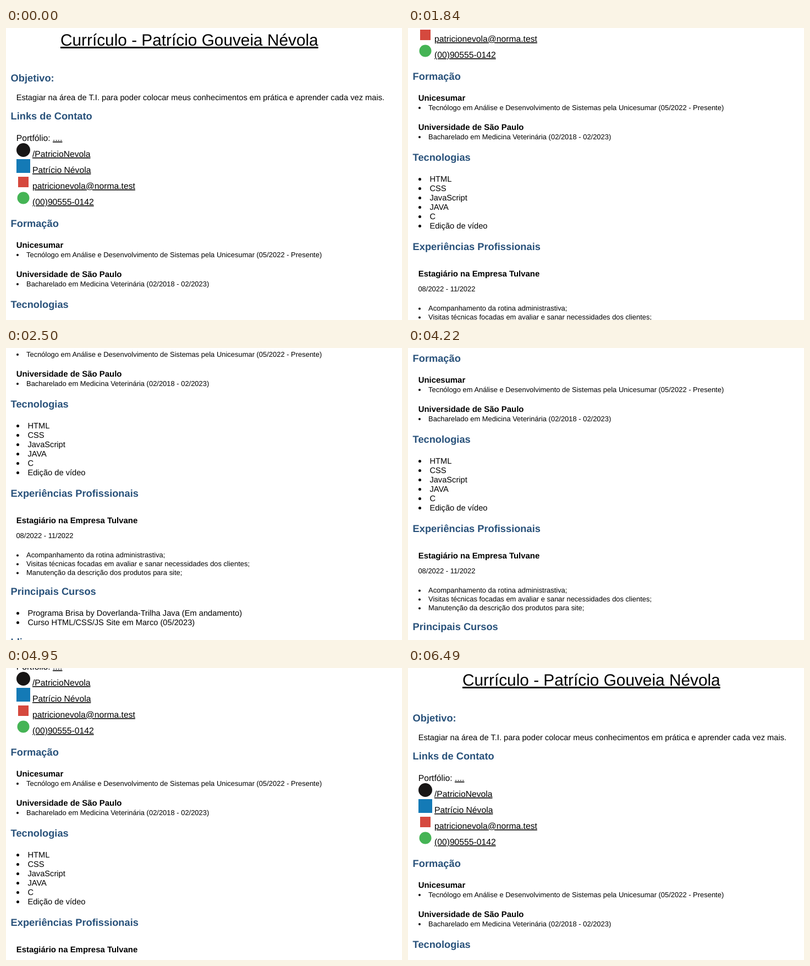
An HTML page for the animation above (7550 ms loop, 720 by 530 pixels).

```html
<!DOCTYPE html>
<html lang="pt-BR">
<head>
<meta charset="utf-8">
<title>Currículo</title>
<style>
  html, body { margin: 0; width: 100%; height: 100%; overflow: hidden; background: #fff; }
  svg { display: block; width: 720px; height: 530px; }
  text {
    font: 14.67px "Liberation Sans", Arial, sans-serif;
    text-rendering: geometricPrecision;
    white-space: pre;
  }
  .title { font-size: 29.8px; text-decoration: underline; }
  .heading text { font-size: 18.25px; font-weight: bold; fill: #28517a; }
  .contact text { font-size: 15.7px; }
  .link { text-decoration: underline; }
  .strong text { font-size: 14.95px; font-weight: bold; }
  .small text { font-size: 12.94px; }
  .dots { stroke: #000; stroke-width: 5; stroke-linecap: round; }
  .small .dots { stroke-width: 4; }

  /* One mouse-wheel notch moves the page by 133.33px, limited to 469px. */
  .page { animation: scroll 7550ms step-end infinite; }
  @keyframes scroll {
    0%      { transform: translateY(0); }
    13.906% { transform: translateY(-133px); }
    24.37%  { transform: translateY(-267px); }
    33.112% { transform: translateY(-400px); }
    41.853% { transform: translateY(-469px); }
    55.893% { transform: translateY(-336px); }
    65.562% { transform: translateY(-202px); }
    75.363% { transform: translateY(-69px); }
    85.96%, 100% { transform: translateY(0); }
  }
</style>
</head>
<body>
<svg viewBox="0 0 720 530">
  <g class="page">
    <text class="title" x="99" y="32">Currículo - Patrício Gouveia Névola</text>

    <g class="heading">
      <text x="8.6" y="97">Objetivo:</text>
      <text x="8.6" y="166">Links de Contato</text>
      <text x="8.6" y="361">Formação</text>
      <text x="8.6" y="508">Tecnologias</text>
      <text x="8.6" y="670">Experiências Profissionais</text>
      <text x="8.6" y="848">Principais Cursos</text>
      <text x="8.6" y="940">Idioma</text>
    </g>

    <text x="18.7" y="131">Estagiar na área de T.I. para poder colocar meus conhecimentos em prática e aprender cada vez mais.</text>

    <g class="contact">
      <text x="18.7" y="205">Portfólio: <tspan class="link">....</tspan></text>
      <circle cx="31.5" cy="221.5" r="12.5" fill="#181616"/>
      <text class="link" x="48" y="234">/PatricioNevola</text>
      <rect x="19" y="238" width="25" height="25" fill="#147ab6"/>
      <text class="link" x="48" y="263">Patrício Névola</text>
      <rect x="22" y="270" width="19" height="19" fill="#d5493e"/>
      <text class="link" x="48" y="292">patricionevola@norma.test</text>
      <circle cx="31.5" cy="308.5" r="11" fill="#45b455"/>
      <text class="link" x="48" y="321">(00)90555-0142</text>
    </g>

    <g class="strong">
      <text x="18.7" y="399">Unicesumar</text>
      <text x="18.7" y="452">Universidade de São Paulo</text>
      <text x="18.7" y="718">Estagiário na Empresa Tulvane</text>
    </g>

    <g class="small">
      <path class="dots" d="M21 412h0m0 53h0M21 776.5h0m0 16h0m0 16h0M21 973.5h0m0 16h0"/>
      <text x="37" y="416">Tecnólogo em Análise e Desenvolvimento de Sistemas pela Unicesumar (05/2022 - Presente)</text>
      <text x="37" y="469">Bacharelado em Medicina Veterinária (02/2018 - 02/2023)</text>
      <text x="18.4" y="745">08/2022 - 11/2022</text>
      <text x="37" y="780">Acompanhamento da rotina administrastiva;</text>
      <text x="37" y="796">Visitas técnicas focadas em avaliar e sanar necessidades dos clientes;</text>
      <text x="37" y="812">Manutenção da descrição dos produtos para site;</text>
      <text x="37" y="977">Português - Nativo</text>
      <text x="37" y="993">Inglês - Intermediário</text>
    </g>

    <path class="dots" d="M21.5 541.5h0m0 17h0m0 17h0m0 17h0m0 17h0m0 17h0M21.5 881.5h0m0 17h0"/>
    <text x="39.4" y="546">HTML</text>
    <text x="39.4" y="563">CSS</text>
    <text x="39.4" y="580">JavaScript</text>
    <text x="39.4" y="597">JAVA</text>
    <text x="39.4" y="614">C</text>
    <text x="39.4" y="631">Edição de vídeo</text>
    <text x="39.4" y="886">Programa Brisa by Doverlanda-Trilha Java (Em andamento)</text>
    <text x="39.4" y="903">Curso HTML/CSS/JS Site em Marco (05/2023)</text>
  </g>
</svg>
</body>
</html>
```
